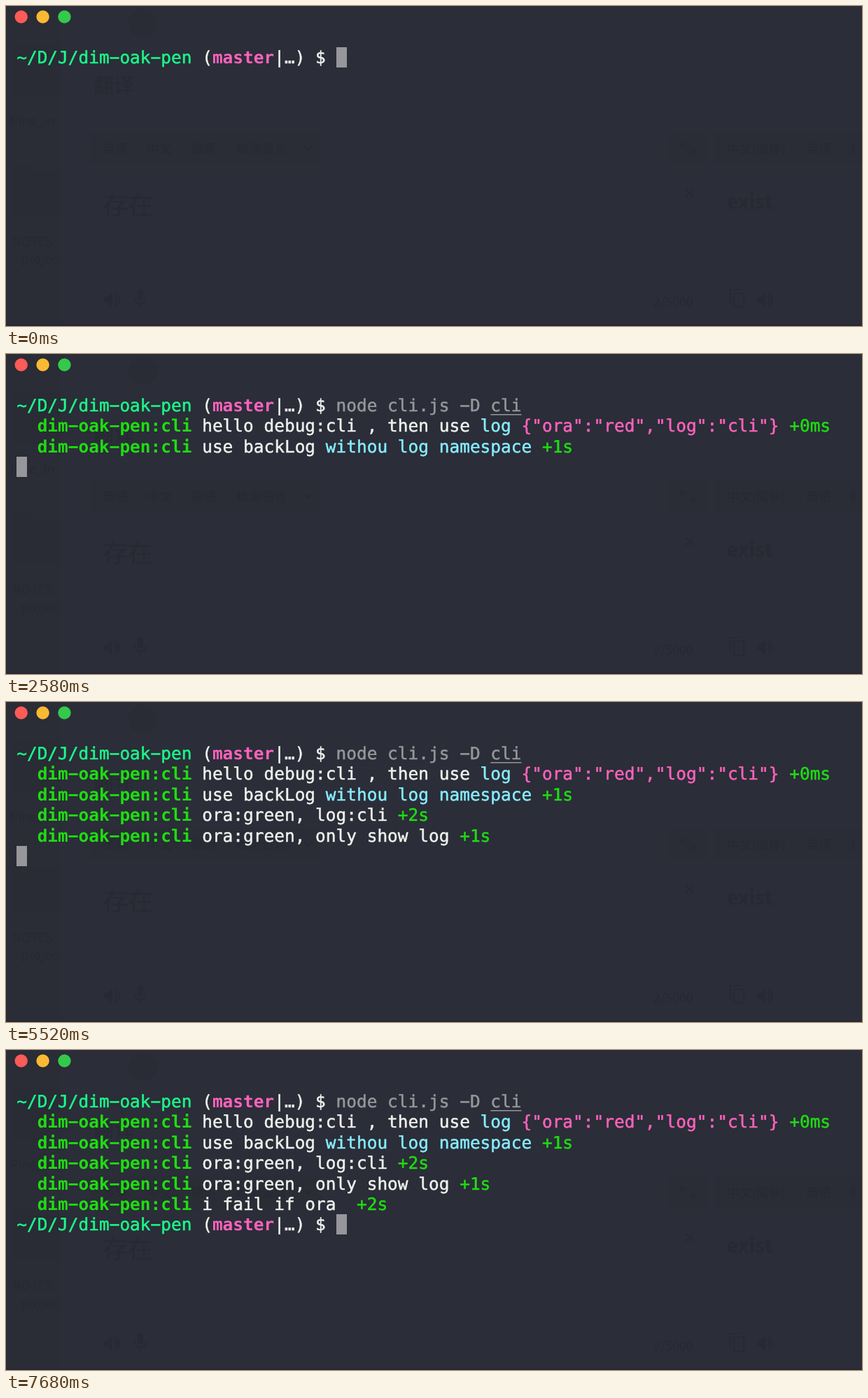
Animation, 1223 px wide and 458 px high, one loop 7740 ms. Source, as an HTML page with a canvas:

```html
<!DOCTYPE html>
<html lang="en">
<head>
<meta charset="utf-8">
<title>Terminal session</title>
<style>
  html, body { margin: 0; width: 100%; height: 100%; overflow: hidden; background: #2b2d38; }
  canvas { display: block; }
</style>
</head>
<body>
<canvas id="stage" width="1223" height="458"></canvas>
<script>
const ctx = document.getElementById('stage').getContext('2d');
ctx.textRendering = 'geometricPrecision';
const LOOP = 7740;
const LEFT = 15.2, TOP = 59, CELL = 14.72, ROW = 29.35;
const MONO = '24.43px "DejaVu Sans Mono", monospace';
const SANS = '"Noto Sans CJK SC", "Noto Sans CJK", sans-serif';
const WHITE = '#f1f2ee', GRAY = '#97979b', PINK = '#ff63bd', CYAN = '#86eefe',
      MINT = '#1bfb8a', GREEN = '#1fdd12', GHOST = '#272933', SHADE = '#2a2c36';

// Runs are [colour, text, bold]
const prompt = [[MINT, '~/D/J/dim-oak-pen'], [WHITE, ' ('], [PINK, 'master', true], [WHITE, '|…) $ ']];
const command = [GRAY, 'node cli.js -D cli'];
const logLine = (...runs) => [[GREEN, '  dim-oak-pen:cli ', true], ...runs];

const COMMAND_AT = 240, ENTER_AT = 600, PROMPT_AT = 6720;
const logs = [
  [900, logLine([WHITE, 'hello debug:cli , then use '], [CYAN, 'log '],
    [PINK, '{"ora":"red","log":"cli"} '], [GREEN, '+0ms'])],
  [1860, logLine([WHITE, 'use backLog '], [CYAN, 'withou log namespace '], [GREEN, '+1s'])],
  [3360, logLine([WHITE, 'ora:green, log:cli '], [GREEN, '+2s'])],
  [4860, logLine([WHITE, 'ora:green, only show log '], [GREEN, '+1s'])],
  [6360, logLine([WHITE, 'i fail if ora  '], [GREEN, '+2s'])],
];

function rect(color, x, y, w, h) {
  ctx.fillStyle = color;
  ctx.fillRect(x, y, w, h);
}

function disc(color, x, y, r) {
  ctx.fillStyle = color;
  ctx.beginPath();
  ctx.arc(x, y, r, 0, Math.PI * 2);
  ctx.fill();
}

function stroke(color, width, path) {
  ctx.strokeStyle = color;
  ctx.lineWidth = width;
  ctx.stroke(new Path2D(path));
}

function label(text, x, y, size, weight = 400) {
  ctx.font = `${weight} ${size}px ${SANS}`;
  ctx.fillStyle = GHOST;
  ctx.fillText(text, x, y);
}

function speaker(x, y) {
  ctx.fillStyle = GHOST;
  ctx.fill(new Path2D(`M${x} ${y - 4}h5l7-6v20l-7-6h-5z`));
  stroke(GHOST, 2, `M${x + 15} ${y - 5}q5 5 0 10M${x + 16} ${y - 10}q12 10 0 20`);
}

// Page that shines faintly through the window
function drawBackdrop() {
  rect('#2b2d38', 0, 0, 1223, 458);
  rect(SHADE, 0, 0, 78, 458);
  rect('#292b35', 10, 55, 68, 74);
  rect('#292b35', 10, 236, 68, 64);
  rect('#292b35', 10, 228, 26, 8);
  label('Pine_in', 6, 171, 18);
  label('NOTES', 9, 344, 18);
  label('projec', 21, 369, 18);

  disc('#292b35', 195, 24, 20);
  label('翻译', 125, 124, 29);
  rect(SHADE, 120, 180, 330, 48);
  rect(SHADE, 944, 180, 60, 48);
  rect(SHADE, 1012, 180, 211, 48);
  [['英语', 138], ['中文', 201], ['德语', 264], ['检测语言', 329], ['中文(简体)', 1030], ['英语', 1143], ['E', 1207]]
    .forEach(([text, x]) => label(text, x, 211, 18));
  stroke(GHOST, 2, 'M427 201l5 5 5-5M963 199h13M968 194l-5 5 5 5M972 209h13M980 204l5 5-5 5');

  label('存在', 138, 298, 36);
  label('exist', 1030, 290, 28, 700);
  label('2/5000', 925, 430, 18);
  stroke(GHOST, 2, 'M971 262l12 12M983 262l-12 12M1035 426v-20h14M1040 411h14v20h-14z'
    + 'M184 417q0 9 8 9t8-9M192 426v6');
  rect(GHOST, 188, 406, 8, 15);
  speaker(140, 420);
  speaker(1073, 420);
  rect('#262631', 0, 456, 1223, 2);
}

// Draws runs on the character grid and returns the next column
function drawRuns(runs, row, col = 0) {
  ctx.lineWidth = 0.5;
  for (const [color, text, bold] of runs) {
    ctx.font = (bold ? 'bold ' : '') + MONO;
    ctx.fillStyle = ctx.strokeStyle = color;
    for (const char of text.replaceAll('-', '−')) {
      const x = LEFT + CELL * col++, y = TOP + ROW * row + 23.1;
      ctx.fillText(char, x, y);
      if (!bold) ctx.strokeText(char, x, y);
    }
  }
  return col;
}

function drawPointer(t) {
  if (t < 4380 || t >= 5100) return;
  const p = Math.max(0, Math.min(1, (t - 4800) / 240));
  ctx.save();
  ctx.translate(1160 + 16 * p, 320 + 56 * p);
  const beam = 'M-5-12q5 0 5 4v16q0 4-5 4M5-12q-5 0-5 4M5 12q-5 0-5-4M-3 2h6';
  stroke('#9a9ba1', 3, beam);
  stroke('#20222b', 1.2, beam);
  ctx.restore();
}

function draw(t) {
  drawBackdrop();
  [['#fc5b57', 21.7], ['#f9b932', 52.6], ['#34c94b', 83.5]].forEach(([color, x]) => disc(color, x, 15.5, 9.2));

  let row = 0, col = drawRuns(prompt, 0);
  if (t >= COMMAND_AT) {
    col = drawRuns([command], 0, col);
    rect(GRAY, LEFT + CELL * (col - 3), 86, CELL * 3, 1.5);
  }
  if (t >= ENTER_AT) {
    row = 1;
    col = 0;
  }
  for (const [at, runs] of logs)
    if (t >= at) drawRuns(runs, row++);
  if (t >= PROMPT_AT) col = drawRuns(prompt, row);

  rect(GRAY, Math.round(LEFT + CELL * col), Math.round(TOP + ROW * row), 15, 29);
  drawPointer(t);
}

function tick() {
  draw(performance.now() % LOOP);
  requestAnimationFrame(tick);
}
tick();
</script>
</body>
</html>
```
